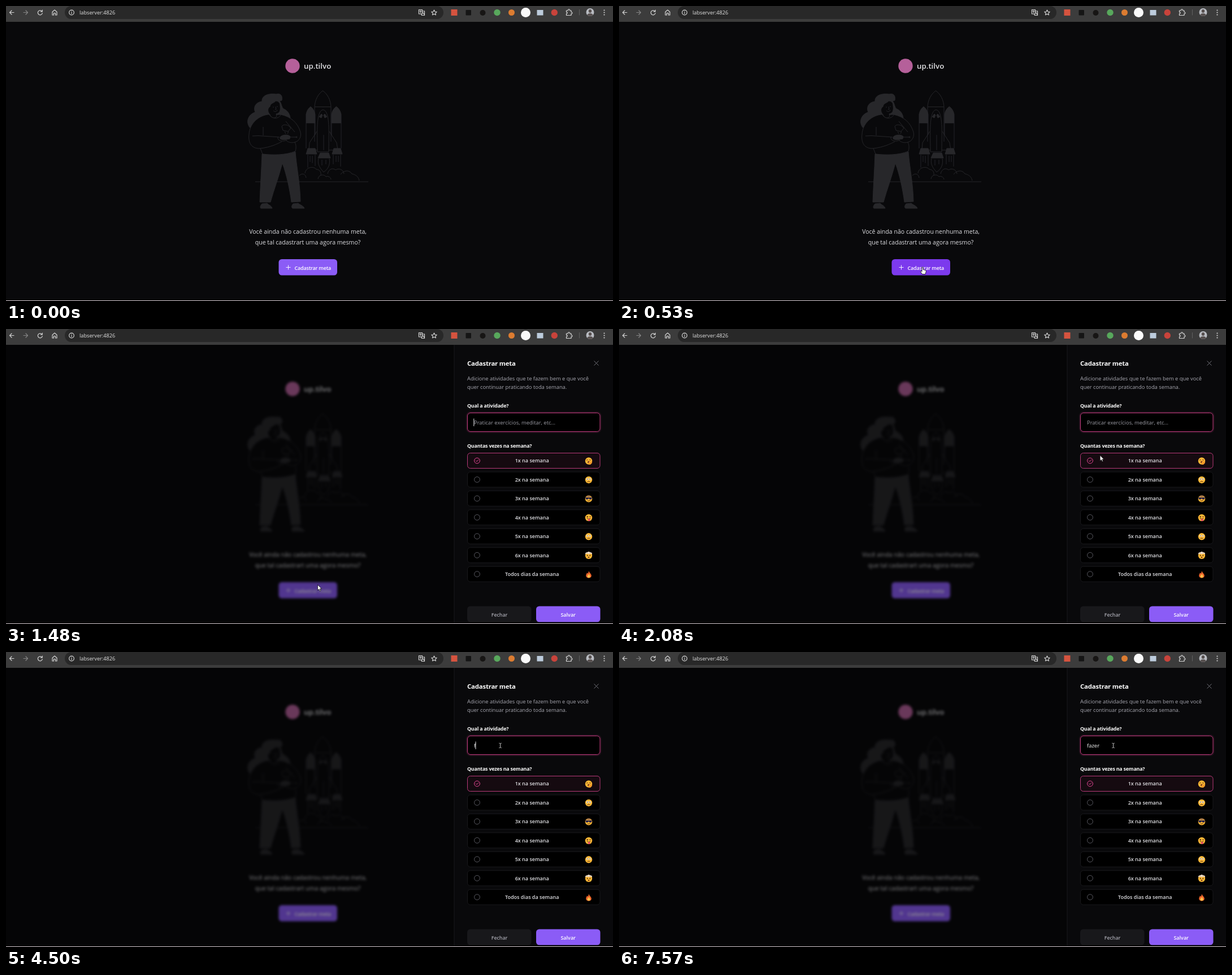
Animation, 1074 px wide and 522 px high, one loop 8 s. Source, as an HTML page:

```html
<!DOCTYPE html>
<html lang="pt-BR">
<head>
<meta charset="utf-8">
<style>
  html, body { margin: 0; width: 100%; height: 100%; overflow: hidden; background: #09090b; }
  svg { display: block; width: 1074px; height: 522px; }
  text { font-family: "Open Sans", "Noto Sans", sans-serif; white-space: pre; }
  .mid { text-anchor: middle; }
  .bold { font-weight: 700; }
  .semi { font-weight: 600; }
  .tight { letter-spacing: -.2px; }
  .line { fill: none; stroke-linecap: round; stroke-linejoin: round; }
</style>
</head>
<body>
<svg viewBox="0 0 1074 522">
  <rect width="1074" height="522" fill="#09090b"/>

  <g id="page">
    <circle cx="507" cy="106" r="12.7" fill="#b5609a"/>
    <text x="527" y="110.6" font-size="13.3" class="semi" fill="#e4e4e7">up.tilvo</text>

    <g stroke="#2a2a2d" stroke-width=".9" fill="none" stroke-linejoin="round">
      <path d="M441 311H641"/>
      <!-- rocket -->
      <path d="M546 240V180C546 166 553 155 560.5 150C568 155 575 166 575 180V240M546.5 178.500H574.5"/>
      <path d="M531 207V252M547 207V228M576 207V228M593 207V252"/>
      <path d="M551 258C551 232 549 202 555 189C558 182 564 182 567 189C573 202 571 232 571 258ZM550 222L537 242L536 255H551M572 222L585 242L587 255H571M562 228V255"/>
      <g fill="#27272a">
        <path d="M531 207V192C532 185 536 180 539 178C543 181 546 186 547 192V207Z"/>
        <path d="M576 207V192C577 185 581 180 584.5 178C589 181 592 186 593 192V207Z"/>
        <path d="M534 252H547L550 262H531ZM556 260H571L574 269H552ZM580 252H592L595 262H577Z"/>
        <path d="M554 196L558 191L560 193L558 198ZM568 196L564 191L562 193L564 198Z"/>
      </g>
      <path d="M534 263V286M538 265V276M542 265V278M547 263V283M579 263V280M584 265V276M588 265V276M592 263V284M553 270C550 282 558 289 562 294C571 288 574 279 572 270M559 272V282M566 272V280"/>
      <path d="M519 300C524 295 530 297 531 304M529 296C530 286 543 282 549 289C555 289 558 294 557 300M552 306C553 298 563 297 566 302C571 300 575 304 575 307M569 297C571 288 578 286 583 290C590 286 597 290 598 297M592 298C598 290 608 290 612 297C618 298 624 302 625 309"/>
      <!-- person -->
      <path fill="#27272a" d="M488 167C490 158 485 154 478 156C463 154 452 159 453 169C442 170 437 179 441 188C430 191 424 203 430 213C431 216 434 216 436 215C440 205 450 196 462 193L485 192C492 194 498 197 503 198C502 190 497 184 491 182C487 179 488 172 484 168Z"/>
      <path fill="#09090b" d="M467 178C468 171 475 172 477 168C482 168 485 171 485 176C486 184 485 190 478 191L479 195C476 200 469 199 467 192C463 188 462 181 467 178Z"/>
      <path d="M473 178V180M480 177V179M477 178L478 183L476 183M473 185C475 188 479 187 480 184"/>
      <path fill="#09090b" d="M463 192C445 195 431 209 430 227C428 244 436 253 450 252L454 262C474 264 495 264 512 257C514 250 513 245 511 241C519 239 523 231 521 223C516 207 505 196 486 192C484 200 470 201 466 192Z"/>
      <path d="M436 230L446 229.500L484 232M450 252C468 250 480 244 488 240M455 214V229M511 241C505 243 499 241 496 238M495 204L511 223M488 213C490 209 497 210 500 212L504 216L499 222L490 220ZM493 222L495 226M500 222L498 226"/>
      <path fill="#27272a" d="M485 232C489 227 500 227 503 231L502 235C496 236 490 238 485 235Z"/>
      <path d="M481 232C480 239 490 241 497 237M503 232H513"/><circle cx="514" cy="232" r="1"/>
      <path fill="#27272a" d="M453 262C470 265 495 264 512 258C514 285 520 310 521 346L505 347C502 325 497 300 489 278C483 302 474 325 468 347L449 347C450 320 452 290 453 262Z"/>
      <path fill="#27272a" d="M453 350C450 353 449 357 451 358H471C470 353 464 352 462 349ZM508 350C505 353 505 357 507 358H528C526 353 520 352 517 349Z"/>
    </g>

    <g class="mid" font-size="10.57" fill="#dedee2">
      <text x="534" y="402.8">Você ainda não cadastrou nenhuma meta,</text>
      <text x="534" y="421.6">que tal cadastrart uma agora mesmo?</text>
    </g>
    <rect id="button" x="482.5" y="448" width="103.5" height="28.5" rx="5.5"/>
    <path d="M495.5 462.500h8M499.500 458.500v8" stroke="#f4f0ff"/>
    <text x="510.5" y="466.6" font-size="9" class="semi tight" fill="#fff">Cadastrar meta</text>
  </g>

  <g id="dialog">
    <rect y="28" width="1074" height="494" opacity=".42"/>
    <rect x="793" y="28" width="281" height="494" fill="#09090b"/>
    <path d="M793 28V522" stroke="#1a1a1d"/>
    <path d="M1040.500 56.500l8 8m0-8l-8 8" stroke="#71717a"/>
    <text x="816" y="65" font-size="11.4" class="bold tight" fill="#fafafa">Cadastrar meta</text>
    <g font-size="9.37" fill="#a8a8b1">
      <text x="816" y="90.5">Adicione atividades que te fazem bem e que você</text>
      <text x="816" y="106.3">quer continuar praticando toda semana.</text>
    </g>
    <g font-size="8.9" class="bold tight" fill="#fafafa">
      <text x="816" y="138.6">Qual a atividade?</text>
      <text x="816" y="209.6">Quantas vezes na semana?</text>
    </g>
    <rect x="815" y="147" width="237.5" height="36" rx="7" fill="none" stroke="#ec4899" stroke-width="2" opacity=".12"/>
    <rect x="816.5" y="148.5" width="234.5" height="33" rx="5.5" fill="#000" stroke="#c43c80"/>
    <text id="hint" x="828" y="169.3" font-size="9.45" fill="#9c9ca5">Praticar exercícios, meditar, etc...</text>
    <text id="typed" x="828" y="169.3" font-size="9.45" fill="#fafafa"></text>
    <rect id="caret" y="158.5" width="1" height="13.5" fill="#e4e4e7"/>
    <g id="options"></g>
    <rect x="816" y="490.5" width="113.5" height="28" rx="5.5" fill="#18181b"/>
    <rect x="938" y="490.5" width="113.5" height="28" rx="5.5" fill="#8b5cf6"/>
    <text x="873" y="508.5" font-size="8.8" class="mid semi" fill="#a8a8b1">Fechar</text>
    <text x="994.7" y="508.5" font-size="9" class="mid semi" fill="#fff">Salvar</text>
  </g>

  <!-- browser bar -->
  <rect width="1074" height="28" fill="#3c3c3c"/>
  <rect x="104" width="670" height="23" rx="11.5" fill="#282828"/>
  <g class="line" stroke="#d5d5d5" stroke-width="1.2">
    <path d="M14 11.500H6.500m3.500-3.500l-3.500 3.500l3.500 3.500"/>
    <path d="M31 11.500h7.500m-3.500-3.500l3.500 3.500l-3.500 3.500" stroke="#858585"/>
    <path d="M63.500 9.300A4 4 0 1 0 64.300 12.500M64.300 7v2.800h-2.800"/>
    <path d="M82 10.500l4-3.500l4 3.500V16h-2.500v-3.500h-3V16H82Z"/>
    <circle cx="116" cy="11.5" r="4.3"/><path d="M116 11v2.500M116 9.200v.1"/>
    <path d="M730.500 6.500h6v7.500h-6ZM736.500 9h4v7.500h-5l-1-2.500M732 9h3M733.500 8v4M738 11.500l1.500 3"/>
    <path d="M757.500 7l1.400 3l3.300.4l-2.400 2.200l.6 3.200l-2.900-1.600l-2.900 1.600l.6-3.200l-2.400-2.200l3.300-.4Z"/>
    <path d="M991.500 8h3c-.6-3 3.600-3 3 0h2.500v2.800c2.600-.5 2.600 3.300 0 2.900v2.800h-8.500v-3c2.400-.2 2.400-2.700 0-2.700Z"/>
    <path d="M1014.500 6.500V16" stroke="#606060" stroke-width="1"/>
  </g>
  <text x="130" y="15.2" font-size="9.2" fill="#e3e3e3">labserver:4826</text>
  <rect x="787.5" y="6" width="11" height="11" fill="#d5533f"/>
  <rect x="813.5" y="7" width="9.5" height="9.5" rx="1" fill="#151515"/>
  <circle cx="843.5" cy="12" r="5" fill="#171514"/>
  <circle cx="869" cy="11.5" r="5.7" fill="#58a85c"/>
  <circle cx="894.5" cy="11.5" r="5.5" fill="#dc7c31"/>
  <circle cx="919.5" cy="11.5" r="8.5" fill="#fafafa"/>
  <rect x="939.5" y="7" width="11" height="9.5" fill="#bccbdc"/>
  <circle cx="970.3" cy="11.5" r="5.7" fill="#c8433b"/>
  <circle cx="1033.5" cy="11" r="7" fill="#b9bcc2"/>
  <path d="M1028.500 16c0-4 10-4 10 0a7 7 0 0 1-10 0ZM1030.800 9a2.700 3 0 1 1 5.400 0a2.700 3 0 1 1-5.400 0Z" fill="#57504f"/>
  <g fill="#d5d5d5"><circle cx="1058.5" cy="7.5" r="1.1"/><circle cx="1058.5" cy="11.5" r="1.1"/><circle cx="1058.5" cy="15.5" r="1.1"/></g>
  <rect y="521" width="1074" height="1" fill="#d8cdd2"/>

  <circle id="click" cx="539.5" cy="465" r="8" fill="#f4dc4e" opacity=".6"/>
  <g id="cursor">
    <path id="arrow" d="M0 0V9.800L2.300 7.700L3.900 11.200L5.400 10.500L3.900 7.100H7Z" fill="#fff" stroke="#000" stroke-width=".7"/>
    <path id="hand" d="M-1 1C-1-.6 1.200-.6 1.200 1V4.500L5.500 5.500C6.600 6 6.300 8 5.800 9.500L5 12.500H-.3L-3.500 8.300C-4 7-2.500 6.500-1 8Z" stroke="#000" stroke-width=".8"/>
    <path id="beam" class="line" d="M-1.800-4.200Q0-4.200 0-3V3Q0 4.200-1.800 4.200M1.800-4.200Q0-4.200 0-3M0 3Q0 4.200 1.800 4.200" stroke="#d4d4d4" stroke-width=".9"/>
  </g>
</svg>

<script>
const $ = id => document.getElementById(id);
const show = (id, on) => $(id).setAttribute('display', on ? 'inline' : 'none');

// Emoji details, drawn around the centre of each face
const disc = (x, y, r, fill) => `<circle cx="${x}" cy="${y}" r="${r}" fill="${fill}"/>`;
const eyes = (y, r, fill) => disc(-2.3, y, r, fill) + disc(2.3, y, r, fill);
const stroke = (d, color = '#5b3416') => `<path class="line" d="${d}" stroke="${color}"/>`;
const shape = (d, fill) => `<path d="${d}" fill="${fill}"/>`;
const face = disc(0, 0, 6.2, '#fdb735');
const wideEyed = face + eyes(-1.3, 1.8, '#fff') + eyes(-1.3, .8, '#42260f') + stroke('M-2 3H2');
const emojis = [
  face + stroke('M-3.8-1.5l2-.5M1.5-2l2 .5') + disc(0, 2, 1.9, '#70351d') + shape('M0 1.5l5-1l1 3l-3 3h-3Z', '#f39a2a'),
  wideEyed,
  face + shape('M-6-3Q0-8 6-3L3-4H-3Z', '#4a3566') + shape('M-5.8-2.5H5.8L4.8 1H1.3L0-1L-1.300 1H-4.800Z', '#23204a') + stroke('M-2 3.5Q0 4.5 2.5 3'),
  face + disc(-2.3, -1.5, 1.2, '#42260f') + stroke('M1.3-1.5h2.5M-3 1.5Q0 3.5 3 1.5') + shape('M-1 2.500h3.500v2a1.700 1.700 0 0 1-3.500 0Z', '#e8436b'),
  wideEyed,
  face + shape('M-6-2Q-6.500-6 -2.500-5.500Q0-8 2.500-5.500Q6.500-6 6-2L3-3.500L0-2L-3-3.500Z', '#ead9c8') + eyes(0, 1, '#42260f') + disc(0, 3.3, 1.3, '#70351d'),
  shape('M0-6.500C1-3 4.800-1 4.800 2.200C4.800 7.500-4.800 7.500-4.800 2.200C-4.800 0-3.300-1.300-3-3L-1.500-1.500C-.5-3 0-4.500 0-6.500Z', '#f0662b') +
    shape('M.3-1C1 1 2.700 1.700 2.700 3.600C2.700 6.700-2.500 6.700-2.500 3.600C-2.500 2-.3 1.300 .3-1Z', '#fbc04a')
];

$('options').innerHTML = emojis.map((emoji, i) => {
  const y = 233 + i * 33.45, on = i === 0;
  const label = i < 6 ? `${i + 1}x na semana` : 'Todos dias da semana';
  return `<g transform="translate(0 ${y})">
    <rect x="816.5" y="-13.5" width="234.5" height="27" rx="5" fill="${on ? '#150a10' : '#000'}" stroke="${on ? '#b83a79' : '#19191c'}"/>
    <circle cx="833.5" r="4.9" fill="none" stroke="${on ? '#ec4899' : '#5a5a62'}"/>
    ${on ? stroke('M831.5 0l1.5 1.5l2.7-3', '#ec4899') : ''}
    <text x="930.7" y="3.3" font-size="9" class="mid semi" fill="#e0e0e4">${label}</text>
    <g transform="translate(1031 .5)">${emoji}</g></g>`;
}).join('');

const OPEN = 1480;
const path = [ // time, x, y
  [70, 915, 508], [200, 760, 457], [300, 650, 432], [400, 575, 446], [530, 537, 462],
  [810, 537, 464], [880, 539, 465], [1479, 539, 465], [OPEN, 551, 453],
  [1800, 705, 340], [2150, 887, 195], [2290, 881, 178], [2690, 872, 168.5], [2900, 874.5, 165.5]
];
const keys = [[4500, 'f'], [4630, 'fa'], [5030, 'faz'], [5360, 'faze'], [5560, 'fazer'], [5960, 'fazer ']];
const blinks = [OPEN, 2010, 2540, 3100, 3580, 4160, 4500, 6490, 7020, 7570];

function cursorAt(t) {
  const i = path.findIndex(p => p[0] > t);
  if (i < 0) return path[path.length - 1].slice(1);
  const [t0, x0, y0] = path[Math.max(i - 1, 0)], [t1, x1, y1] = path[i];
  const k = Math.max(0, (t - t0) / (t1 - t0));
  return [x0 + (x1 - x0) * k, y0 + (y1 - y0) * k];
}

function render(t) {
  const open = t >= OPEN;
  const [x, y] = cursorAt(t);
  const hover = !open && x > 482 && x < 586 && y > 448 && y < 477;
  const inInput = open && x > 816 && y > 148 && y < 182;

  show('dialog', open);
  $('page').style.filter = open ? 'blur(2.2px)' : 'none';
  $('button').setAttribute('fill', hover ? '#7c3aed' : '#8b5cf6');

  show('click', t >= 1350 && !open);
  show('cursor', t >= 70);
  $('cursor').setAttribute('transform', `translate(${x} ${y})`);
  $('hand').setAttribute('fill', t >= 1350 ? '#fbf0a8' : '#fff');
  show('hand', hover);
  show('beam', inInput);
  show('arrow', !hover && !inInput);

  const text = keys.reduce((last, [at, value]) => t >= at ? value : last, '');
  $('typed').textContent = text;
  show('hint', !text);
  show('caret', blinks.filter(at => t >= at).length % 2 === 1);
  $('caret').setAttribute('x', 827.3 + (text ? $('typed').getComputedTextLength() : 0));
}

function tick() {
  render(performance.now() % 8000);
  requestAnimationFrame(tick);
}
tick();
</script>
</body>
</html>
```
